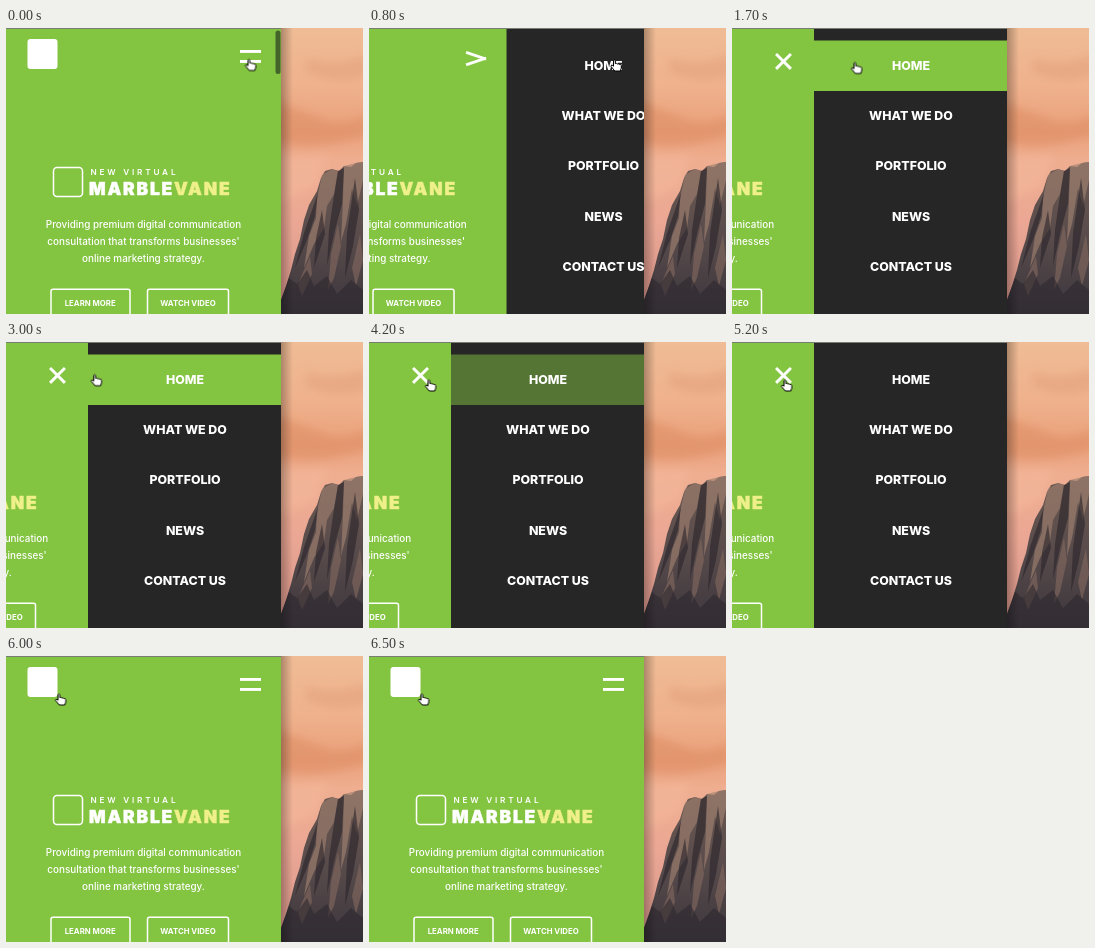
Recreate the animation shown at these times as an HTML page. Size 357 by 286 pixels, loop 6600 ms.

```html
<!DOCTYPE html>
<html lang="en">
<head>
<meta charset="utf-8">
<title>Sliding menu</title>
<style>
  html, body { margin: 0; width: 100%; height: 100%; overflow: hidden; background: #83c441; }
  svg { display: block; }
  text { font-family: Inter, "Open Sans", sans-serif; fill: #fff; }

  .page, .bar, .hover, .scroll, .cursor, .hand, .arrow {
    animation: 6.6s linear infinite;
  }
  .page { animation-name: slide; }
  .bar { transform-box: fill-box; transform-origin: center; fill: #fff; }
  .top { animation-name: cross-top; }
  .bottom { animation-name: cross-bottom; }
  .hover { animation-name: hover; fill: #83c441; }
  .scroll { animation-name: scroll; fill: #42642a; }
  .cursor { animation-name: travel; }
  .hand { animation-name: hand; }
  .arrow { animation-name: arrow; }
  .hand, .arrow { animation-timing-function: step-end; }

  .menu { font-size: 12.4px; font-weight: 800; text-anchor: middle; }
  .lead { font-size: 9.9px; font-weight: 500; text-anchor: middle; }
  .button { font-size: 7.8px; font-weight: 700; text-anchor: middle; }
  .outline { fill: none; stroke: #fff; stroke-width: 1.5; }
  .over { font-size: 8.2px; font-weight: 600; letter-spacing: 2.8px; }
  .title { font-size: 17.4px; font-weight: 900; letter-spacing: 1.8px; stroke: #fff; stroke-width: .5; }
  .title tspan { fill: #eff08a; stroke: #eff08a; }

  @keyframes slide {
    0% { transform: none; }
    8.94% { transform: none; animation-timing-function: ease; }
    16.52%, 82.145% { transform: translateX(-193px); animation-timing-function: ease; }
    89.72%, 100% { transform: none; }
  }
  @keyframes cross-top {
    0%, 8.94%, 89.72%, 100% { transform: translateY(0) rotate(0deg); }
    16.52%, 82.145% { transform: translateY(10px) rotate(45deg); }
  }
  @keyframes cross-bottom {
    0%, 8.94%, 89.72%, 100% { transform: rotate(0deg); }
    16.52%, 82.145% { transform: rotate(-45deg); }
  }
  @keyframes hover {
    0%, 18.9% { opacity: 0; }
    23.5%, 61.4% { opacity: 1; }
    65.9%, 100% { opacity: 0; }
  }
  @keyframes scroll {
    0%, 4.5% { opacity: 1; }
    9%, 100% { opacity: 0; }
  }
  @keyframes travel {
    0%, 9% { transform: translate(238.5px, 30.5px); }
    12.1%, 17.5% { transform: translate(241px, 31px); animation-timing-function: ease-in-out; }
    25.76%, 32% { transform: translate(118.5px, 33.5px); }
    42.42% { transform: translate(88px, 32px); }
    53.03%, 60.6% { transform: translate(75px, 31px); }
    63.64% { transform: translate(55.5px, 37px); }
    72% { transform: translate(46px, 37px); }
    78.79%, 100% { transform: translate(48.5px, 37px); }
  }
  @keyframes hand {
    0%, 90.2%, 100% { opacity: 1; }
    82.5% { opacity: 0; }
  }
  @keyframes arrow {
    0%, 90.2%, 100% { opacity: 0; }
    82.5% { opacity: 1; }
  }
</style>
</head>
<body>
<svg width="357" height="286" viewBox="0 0 357 286">
  <defs>
    <linearGradient id="sky" x2="0" y2="1">
      <stop offset="0" stop-color="#efbc95"/>
      <stop offset=".2" stop-color="#efb28d"/>
      <stop offset=".36" stop-color="#e9a07a"/>
      <stop offset=".46" stop-color="#efae90"/>
      <stop offset=".68" stop-color="#eba794"/>
      <stop offset="1" stop-color="#d8948a"/>
    </linearGradient>
    <linearGradient id="rock" x2="0" y2="1">
      <stop offset="0" stop-color="#6d5a52"/>
      <stop offset=".5" stop-color="#584b4b"/>
      <stop offset="1" stop-color="#3c363d"/>
    </linearGradient>
    <linearGradient id="shade">
      <stop offset="0" stop-color="#000" stop-opacity=".28"/>
      <stop offset="1" stop-color="#000" stop-opacity="0"/>
    </linearGradient>
    <filter id="soft" x="-30%" y="-60%" width="160%" height="220%">
      <feGaussianBlur stdDeviation="4"/>
    </filter>
  </defs>

  <rect width="276" height="286" fill="#83c441"/>

  <g class="page">
    <rect x="21.5" y="11" width="30" height="30" rx="3" fill="#fff"/>
    <rect class="bar top" x="234" y="22" width="21" height="2.9"/>
    <rect class="bar bottom" x="234" y="32" width="21" height="2.9"/>

    <rect class="outline" x="47.5" y="139.5" width="29" height="29" rx="3.5"/>
    <text class="over" x="84.5" y="147">NEW VIRTUAL</text>
    <text class="title" x="83" y="167">MARBLE<tspan>VANE</tspan></text>

    <g class="lead">
      <text x="137.5" y="200">Providing premium digital communication</text>
      <text x="137.5" y="217">consultation that transforms businesses'</text>
      <text x="137.5" y="234">online marketing strategy.</text>
    </g>

    <g class="button">
      <rect class="outline" x="45" y="261.3" width="79" height="28" rx="2"/>
      <text x="84.2" y="278">LEARN MORE</text>
      <rect class="outline" x="141.5" y="261.3" width="81" height="28" rx="2"/>
      <text x="182" y="278">WATCH VIDEO</text>
    </g>

    <rect x="275" width="194" height="286" fill="#262626"/>
    <rect class="hover" x="275" y="12.5" width="194" height="50.5"/>
    <g class="menu">
      <text x="372" y="41.6">HOME</text>
      <text x="372" y="92">WHAT WE DO</text>
      <text x="372" y="142.2">PORTFOLIO</text>
      <text x="372" y="192.6">NEWS</text>
      <text x="372" y="243">CONTACT US</text>
    </g>
  </g>
  <!-- Covers the menu edge while the page is at rest -->
  <rect class="scroll" x="269.5" y="2.5" width="5" height="43.5" rx="2.5"/>
  <rect width="276" height="1" fill="#777d72"/>

  <!-- Desktop scenery -->
  <svg x="275.6" width="81.4" height="286" viewBox="275.6 0 81.4 286">
    <rect x="275" width="82" height="286" fill="url(#sky)"/>
    <g filter="url(#soft)">
      <path d="M270 74Q300 84 318 92T362 86V106Q330 118 304 118T270 112Z" fill="#e08f66" opacity=".6"/>
      <path d="M300 30Q330 40 362 26V48Q330 58 300 44Z" fill="#e3a27f" opacity=".6"/>
      <path d="M270 126Q300 134 320 126L310 158 270 176Z" fill="#f4b79b" opacity=".6"/>
    </g>
    <path d="M275 272 280 258 285 242 289 226 294 211 298 192 303 177 311 163 315 150 319 143 326 141 333 143 338 138 345 139 350 135 357 134V286H275Z" fill="url(#rock)"/>
    <path d="M316 147 326 141 332 143 328 166 321 178 318 200 308 216 298 240 303 208 310 190 311 170Z" fill="#96796a" opacity=".75"/>
    <path d="M338 138 350 135 357 134V152L351 178 346 160 340 196 335 214 337 172Z" fill="#a08270" opacity=".65"/>
    <path d="M332 143 338 140 336 176 329 202 321 238 323 202 327 174ZM349 150 353 182 347 218 339 250 341 205ZM312 165 309 188 301 212 289 240 298 205ZM316 182 319 206 308 240 310 210Z" fill="#29242a" opacity=".6"/>
    <path d="M332 196 335 218 328 250 322 262 325 226ZM354 206 357 232 350 258 346 240ZM304 228 306 246 296 268 292 256Z" fill="#85695f" opacity=".6"/>
    <path d="M275 272 283 250 291 256 301 242 308 258 321 248 331 266 345 252 357 262V286H275Z" fill="#2d282f" opacity=".6"/>
    <rect x="275" width="12" height="286" fill="url(#shade)"/>
  </svg>

  <g class="cursor" fill="#fff" stroke="#000" stroke-linejoin="round">
    <path class="hand" d="M3.5 7.2V1.6Q4.4 .3 5.3 1.6V4.6Q6.5 3.9 7.3 5 8.5 4.4 9.3 5.5 11 5 11.3 6.6V9L10.3 12H4.8L1 7.4Q1 6 2.2 6.3Z"/>
    <path class="arrow" d="M4 -.6V9.4L6.3 7.2 8 10.9 9.5 10.2 7.9 6.6H11Z" fill="#000" stroke="#fff" stroke-width=".8"/>
  </g>
</svg>
</body>
</html>
```
